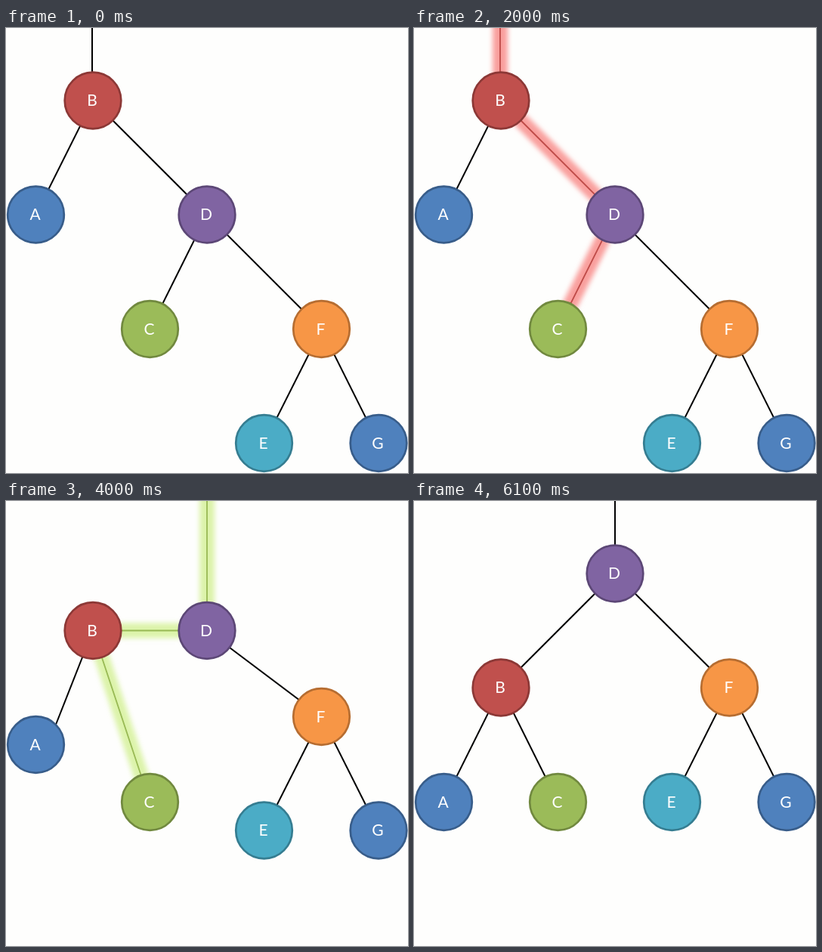
Animation, 532 px wide and 589 px high, one loop 6.5 s. Source, as an HTML page:

```html
<!DOCTYPE html>
<html lang="en">
<head>
<meta charset="utf-8">
<title>Tree rotation</title>
<style>
  html, body { margin: 0; width: 100%; height: 100%; overflow: hidden; background: #fefefd; }
  svg { display: block; }
  text { font: 21px Lato, "Open Sans", sans-serif; fill: #fff; text-anchor: middle; }
</style>
</head>
<body>
<svg width="532" height="589" viewBox="0 0 532 589">
  <defs>
    <filter id="soft" filterUnits="userSpaceOnUse" x="-40" y="-40" width="612" height="669"
            color-interpolation-filters="sRGB">
      <feGaussianBlur stdDeviation="3.4"/>
    </filter>
  </defs>
  <g id="scene"></g>
</svg>
<script>
const LOOP = 6500;
const RADIUS = 37.3;

const nodes = {
  A: { x: 39.5, fill: '#4f81bd', line: '#385d8a' },
  B: { x: 115, fill: '#c0504d', line: '#8c3836' },
  C: { x: 190.5, fill: '#9bbb59', line: '#71893f' },
  D: { x: 266, fill: '#8064a2', line: '#5c4776' },
  E: { x: 341.5, fill: '#4bacc6', line: '#357d91' },
  F: { x: 417.5, fill: '#f79646', line: '#b66d31' },
  G: { x: 493, fill: '#4f81bd', line: '#385d8a' }
};

const red = { line: '#be4b48', glow: '#f99f9d' };
const green = { line: '#98b954', glow: '#dcf3aa' };

// Heights of the nodes A to G in each layout.
const before = [247, 96, 398.5, 247, 549.5, 398.5, 549.5];
const middle = [322.5, 171.5, 398.5, 171.5, 436, 285.5, 436];
const after = [398.5, 247, 398.5, 96, 398.5, 247, 398.5];

// "^" stands for the entry point above the stage.
const oldLinks = ['^B', 'BD', 'DC'];
const newLinks = ['^D', 'DB', 'BC'];
const fixedLinks = ['BA', 'DF', 'FE', 'FG'];

const steps = [
  { start: 0, heights: before, links: oldLinks },
  { start: 1000, heights: before, links: oldLinks, arrow: true },
  { start: 2000, heights: before, links: oldLinks, mark: red },
  { start: 3000, heights: before, links: newLinks, mark: green },
  { start: 4000, heights: middle, links: newLinks, mark: green, lean: 16 },
  { start: 4500, heights: after, links: newLinks, mark: green },
  { start: 5500, heights: after, links: newLinks }
];

const turnArrow = `
  <g stroke="#71893f" stroke-width="2" stroke-linejoin="round">
    <path fill="#71923c" d="M153 51A30 39 0 0 0 123 12H112Q115 12 117.5 12.8A30 39 0 0 1 142 51Z"/>
    <path fill="#9bbb59" d="M87 51L78.5 41H83A30 39 0 0 1 112 12Q115 12 117.5 12.8A30 39 0 0 0 94 40L98 39Z"/>
  </g>`;

function segment(link, step) {
  const place = name => ({ x: nodes[name].x, y: step.heights['ABCDEFG'.indexOf(name)] });
  const end = place(link[1]);
  if (link === 'BA') end.x += step.lean || 0;
  if (link === '^B') end.x -= 1;
  const start = link[0] === '^' ? { x: end.x, y: -60 } : place(link[0]);
  return [start, end];
}

// The trim keeps a rounded glow from spreading past the rim of a node.
function stroke([a, b], color, width, trim = 0) {
  const length = Math.hypot(b.x - a.x, b.y - a.y);
  const dx = (b.x - a.x) / length * trim;
  const dy = (b.y - a.y) / length * trim;
  return `<line x1="${a.x + dx}" y1="${a.y + dy}" x2="${b.x - dx}" y2="${b.y - dy}"
    stroke="${color}" stroke-width="${width}" stroke-linecap="round"/>`;
}

function drawNode(name, y) {
  const { x, fill, line } = nodes[name];
  return `<circle cx="${x}" cy="${y}" r="${RADIUS}" fill="${fill}" stroke="${line}" stroke-width="2.7"/>
    <text x="${x - 1}" y="${y + 7.3}">${name}</text>`;
}

function drawStep(step) {
  const moving = step.links.map(link => segment(link, step));
  const fixed = fixedLinks.map(link => segment(link, step));
  const { mark } = step;
  const glow = mark ? moving.map(s => stroke(s, mark.glow, 20, RADIUS)).join('') : '';
  return `<g filter="url(#soft)">${glow}</g>`
    + fixed.map(s => stroke(s, '#000', 2)).join('')
    + moving.map(s => stroke(s, mark ? mark.line : '#000', mark ? 1.8 : 2)).join('')
    + Object.keys(nodes).map((name, i) => drawNode(name, step.heights[i])).join('')
    + (step.arrow ? turnArrow : '');
}

const scene = document.getElementById('scene');
let shown;

function tick() {
  const time = performance.now() % LOOP;
  const step = steps.findLast(s => s.start <= time);
  if (step !== shown) {
    scene.innerHTML = drawStep(step);
    shown = step;
  }
  requestAnimationFrame(tick);
}
tick();
</script>
</body>
</html>
```
